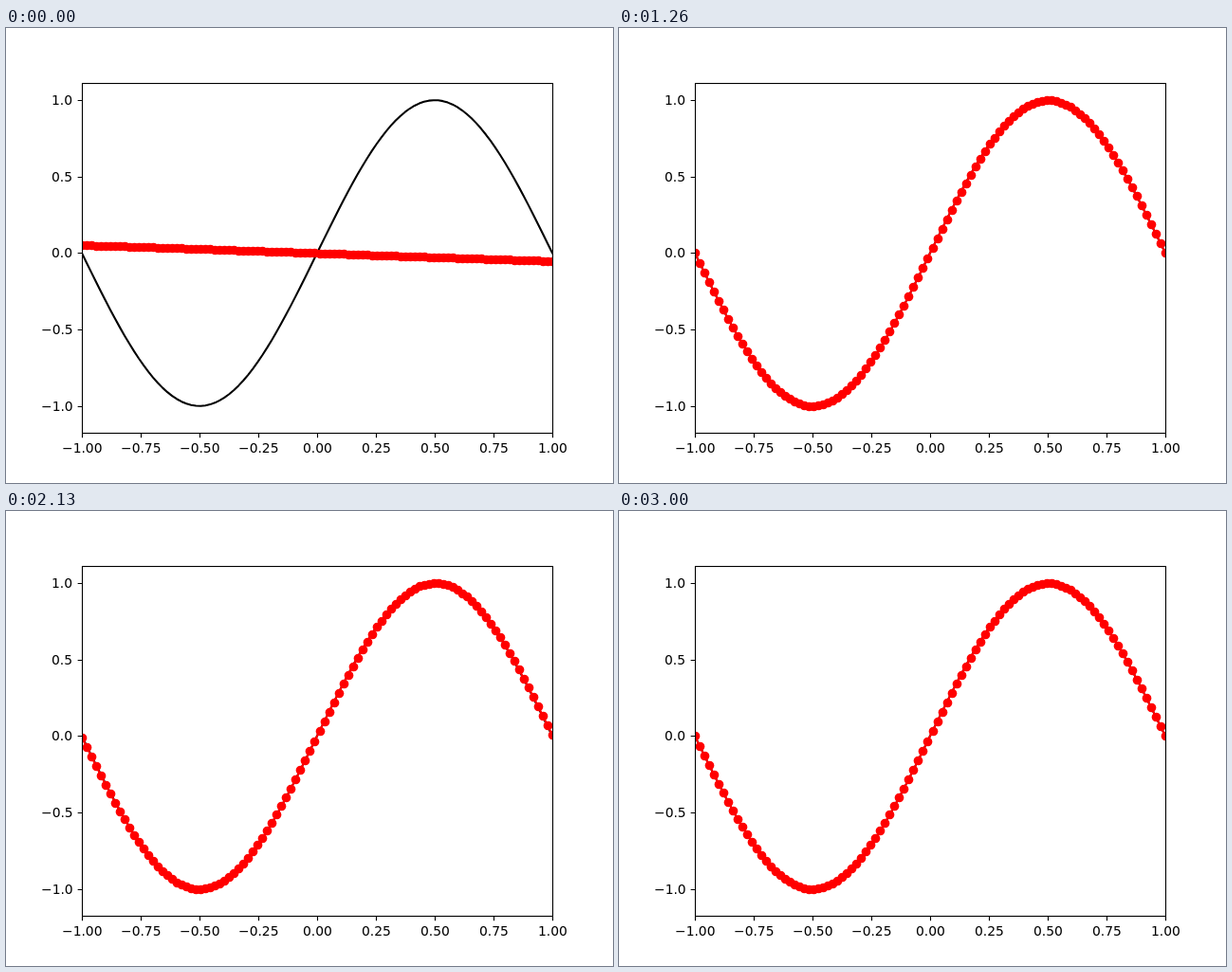
Animation of 640 by 480 pixels, one loop 3.03 s. Source, as an HTML page with a canvas:

```html
<!DOCTYPE html>
<html lang="en">
<head>
<meta charset="utf-8">
<title>Sine fit</title>
<style>
  html, body { margin: 0; width: 100%; height: 100%; overflow: hidden; background: #fff; }
  canvas { display: block; width: 640px; height: 480px; }
</style>
</head>
<body>
<canvas id="plot" width="640" height="480"></canvas>
<script>
const ctx = document.getElementById('plot').getContext('2d');
const STEP = 30, STEPS = 101, POINTS = 100;
const LEFT = 80, RIGHT = 576, TOP = 58, BOTTOM = 427;

const px = x => 328 + 248 * x;
const py = y => 237.45 - 161.3 * y;
const xs = Array.from({ length: POINTS }, (_, i) => -1 + 2 * i / (POINTS - 1));

const ease = u => (1 - Math.cos(Math.PI * Math.min(u, 1))) / 2;

// The fit overshoots while its ends fold inward, then keeps a faint ripple at the ends
function fitAt(k) {
  const height = 1 - 1.092 * Math.exp(-k / 3.2) * Math.cos(0.41 * k);
  const width = 0.6 + (Math.PI - 0.6) * ease(k / 14);
  const offset = -0.03 * Math.sin(Math.PI * Math.min(k / 15, 1));
  const ripple = 0.0001 * k * Math.sin(0.2587 * Math.PI * (k - 100));
  return x => height * Math.sin(width * x) + offset + ripple * x ** 3;
}

function curve(f, color) {
  ctx.beginPath();
  xs.forEach(x => ctx.lineTo(px(x), py(f(x))));
  ctx.strokeStyle = color;
  ctx.lineWidth = 2.083;
  ctx.lineJoin = 'round';
  ctx.lineCap = 'square';
  ctx.stroke();
}

// Dots sit on whole pixels
function dots(f) {
  ctx.fillStyle = '#f00';
  for (const x of xs) {
    ctx.beginPath();
    ctx.arc(Math.round(px(x)) + 0.5, Math.round(py(f(x))) + 0.5, 4.86, 0, 2 * Math.PI);
    ctx.fill();
  }
}

// Text starts on a whole pixel; align is the share of its width left of x
function label(value, digits, x, y, align) {
  const text = value.toFixed(digits).replace('-', '\u2212');
  ctx.fillText(text, Math.round(x - align * ctx.measureText(text).width), y);
}

function axes() {
  ctx.fillStyle = ctx.strokeStyle = '#000';
  ctx.lineWidth = 1.11;
  ctx.lineCap = 'butt';
  ctx.lineJoin = 'miter';
  ctx.strokeRect(LEFT + 0.5, TOP + 0.5, RIGHT - LEFT, BOTTOM - TOP);
  ctx.font = '13.889px "DejaVu Sans", sans-serif';
  ctx.beginPath();
  for (let i = -4; i <= 4; i++) {
    const x = px(i / 4);
    ctx.moveTo(x + 0.5, BOTTOM + 0.5);
    ctx.lineTo(x + 0.5, BOTTOM + 5.36);
    label(i / 4, 2, x, 448, 0.5);
  }
  for (let i = -2; i <= 2; i++) {
    const y = Math.round(py(i / 2));
    ctx.moveTo(LEFT + 0.5, y + 0.5);
    ctx.lineTo(LEFT - 4.36, y + 0.5);
    label(i / 2, 1, 70.3, y + 5, 1);
  }
  ctx.stroke();
}

function draw(k) {
  const fit = fitAt(k);
  ctx.fillStyle = '#fff';
  ctx.fillRect(0, 0, 640, 480);
  ctx.save();
  ctx.beginPath();
  ctx.rect(LEFT, TOP, RIGHT - LEFT, BOTTOM - TOP);
  ctx.clip();
  curve(x => Math.sin(Math.PI * x), '#000');
  curve(fit, '#f00');
  dots(fit);
  ctx.restore();
  axes();
}

const start = performance.now();
function tick() {
  draw(Math.floor((performance.now() - start) / STEP) % STEPS);
  requestAnimationFrame(tick);
}
tick();
</script>
</body>
</html>
```
